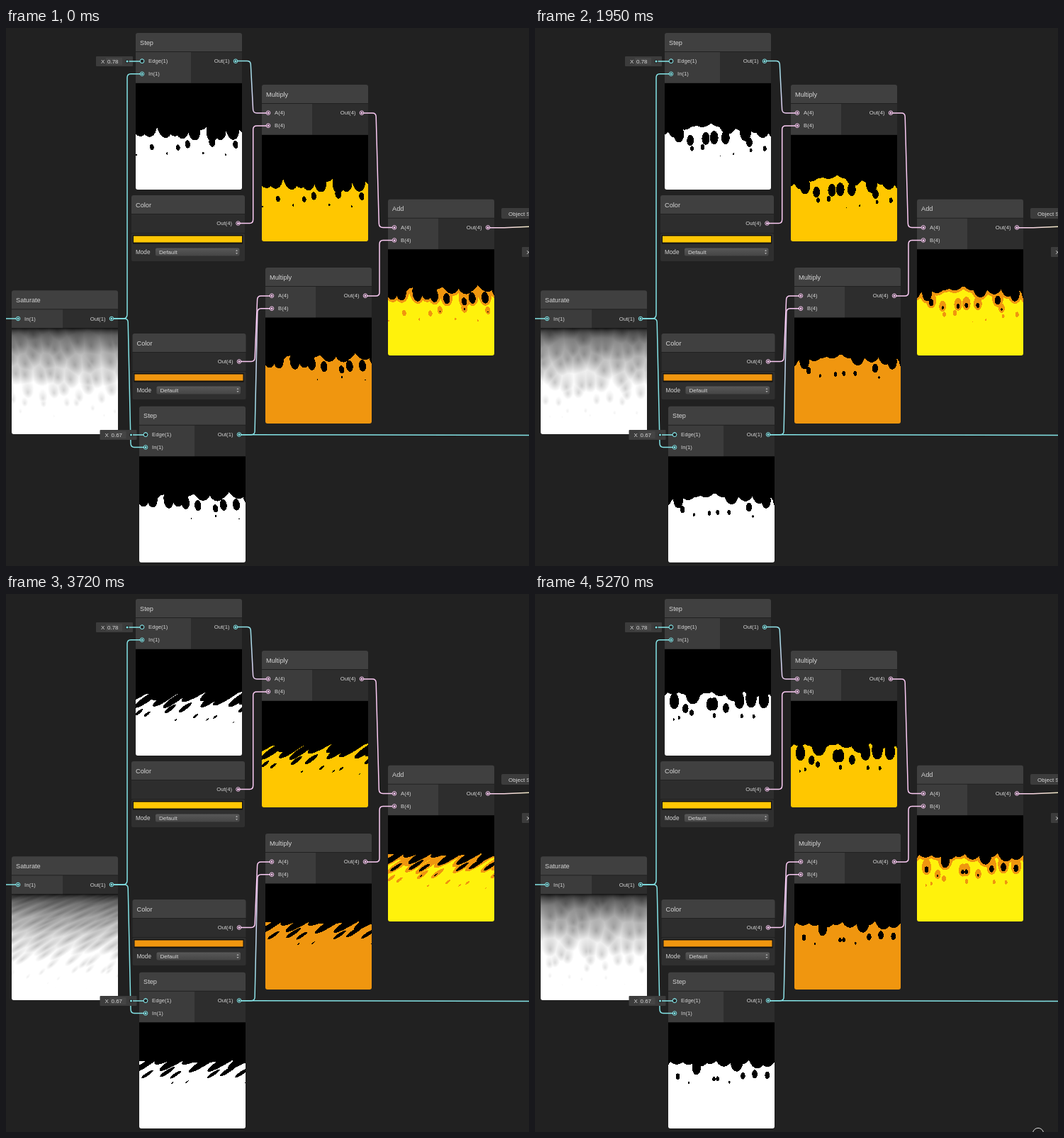
Recreate the animation shown at these times as an HTML page with a canvas. Size 738x759 px, loop 5.37 s.

```html
<!DOCTYPE html>
<html lang="en">
<head>
<meta charset="utf-8">
<title>Flame shader graph</title>
<style>
html, body { margin: 0; width: 100%; height: 100%; overflow: hidden; background: #212121; }
#stage { position: relative; width: 738px; height: 759px; overflow: hidden; background: #212121; }
canvas { position: absolute; width: 150px; height: 150px; border-radius: 0 0 3px 3px; }
svg { position: absolute; left: 0; top: 0; }
text { font-family: "Liberation Sans", Arial, sans-serif; fill: #d6d6d6; }
</style>
</head>
<body>
<div id="stage"><svg id="graph" width="738" height="759" viewBox="0 0 738 759"></svg></div>
<script>
const LOOP = 5370, SIZE = 150;
const CYAN = '#84e4e7', PINK = '#fbcbf4';
const stage = document.getElementById('stage');
const svg = document.getElementById('graph');

// ---------- node graph ----------
const rect = (x, y, w, h, fill, extra = '') =>
  `<rect x="${x}" y="${y}" width="${w}" height="${h}" fill="${fill}" ${extra}/>`;
const text = (x, y, s, size = 7.7, anchor = 'start') =>
  `<text x="${x}" y="${y}" font-size="${size}" text-anchor="${anchor}">${s}</text>`;
const wire = (d, color) => `<path d="${d}" fill="none" stroke="${color}" stroke-width="1.5"/>`;
const port = (x, y, color, linked = true) =>
  `<circle cx="${x}" cy="${y}" r="2.8" fill="#212121" stroke="${color}"/>` +
  (linked ? `<circle cx="${x}" cy="${y}" r="1.5" fill="${color}"/>` : '');
const header = (x, y, w, title) =>
  `<path d="M${x} ${y + 26}V${y + 3}q0 -3 3 -3H${x + w - 3}q3 0 3 3V${y + 26}Z" fill="#404040"/>` +
  text(x + 6, y + 16.5, title, 9.2);

function node(x, y, title, inputs, outColor, outLabel, split) {
  const bodyH = inputs.length > 1 ? 43.5 : 26;
  let s = header(x, y, 150, title) +
    rect(x, y + 27, split, bodyH, '#3c3c3c') +
    rect(x + split, y + 27, 150 - split, bodyH, '#2d2d2d');
  inputs.forEach(([label, color, linked], i) => {
    const py = y + 39.7 + 18 * i;
    s += port(x + 9, py, color, linked) + text(x + 18, py + 2.7, label);
  });
  return s + text(x + 132.5, y + 42.4, outLabel, 7.7, 'end') + port(x + 141, y + 39.7, outColor);
}

function colorNode(x, y, color) {
  return header(x, y, 160, 'Color') +
    rect(x, y + 27, 160, 26, '#2d2d2d') +
    rect(x, y + 54, 160, 39, '#2f2f2f', 'rx="2"') +
    rect(x + 2, y + 56, 155, 12.5, '#111') +
    rect(x + 3, y + 57.5, 153, 9, color) +
    text(x + 142, y + 42.2, 'Out(4)', 7.7, 'end') + port(x + 150.5, y + 39.5, PINK) +
    text(x + 6, y + 83, 'Mode', 8.2) +
    rect(x + 34, y + 74.5, 118.5, 11, 'url(#drop)', 'rx="2"') +
    text(x + 39, y + 82.8, 'Default', 8.1) +
    `<path d="M${x + 147} ${y + 79}h3l-1.5 -2.2zm0 2h3l-1.5 2.2z" fill="#aaa"/>`;
}

const valueBox = (x, y, value) =>
  rect(x, y, 52, 14, '#3c3c3c', 'rx="1"') + rect(x + 14, y + 2, 23, 10, '#454545') +
  text(x + 7, y + 10, 'X', 8) + text(x + 16, y + 10, value, 8) +
  wire(`M${x + 44} ${y + 7}H${x + 62}`, CYAN) +
  `<circle cx="${x + 44}" cy="${y + 7}" r="2.6" fill="#212121"/>` +
  `<circle cx="${x + 44}" cy="${y + 7}" r="1.5" fill="${CYAN}"/>`;

const fade = (id, x1, y1, x2, y2, a, b) =>
  `<linearGradient id="${id}" gradientUnits="userSpaceOnUse" x1="${x1}" y1="${y1}" x2="${x2}" y2="${y2}">` +
  `<stop stop-color="${a}"/><stop offset="1" stop-color="${b}"/></linearGradient>`;

const ab = [['A(4)', PINK, true], ['B(4)', PINK, true]];
const step = [['Edge(1)', CYAN, false], ['In(1)', CYAN, true]];

svg.innerHTML =
  '<defs>' + fade('up', 324, 46, 370, 120, CYAN, PINK) +
  fade('mix', 329, 574, 375, 396, CYAN, PINK) +
  fade('out', 680, 281, 738, 280, PINK, '#eee6c4') +
  '<linearGradient id="drop" x2="0" y2="1"><stop stop-color="#585858"/><stop offset="1" stop-color="#454545"/></linearGradient></defs>' +
  node(183, 7, 'Step', step, CYAN, 'Out(1)', 78) +
  node(361, 80, 'Multiply', ab, PINK, 'Out(4)', 71) +
  colorNode(177, 236, '#ffc704') +
  node(539, 241.7, 'Add', ab, PINK, 'Out(4)', 71) +
  node(366, 338, 'Multiply', ab, PINK, 'Out(4)', 71) +
  node(8, 370.3, 'Saturate', [['In(1)', CYAN, true]], CYAN, 'Out(1)', 72) +
  colorNode(178.5, 431, '#f0960f') +
  node(188, 533.8, 'Step', step, CYAN, 'Out(1)', 78) +
  wire('M326 46.5H340Q345 46.5 345.3 51L348.6 115Q349 120 354 120H368', 'url(#up)') +
  wire('M329 275.5H344Q348.7 275.5 348.7 270V143Q348.7 138 354 138H368', PINK) +
  wire('M504 120H517Q522 120 522.2 125L526.3 276Q526.5 281.5 532 281.5H545', PINK) +
  wire('M509 378H522Q527 378 527 373V305Q527 299.5 532 299.5H545', PINK) +
  wire('M682 281.7H703L738 280.3', 'url(#out)') +
  wire('M0 410H14', CYAN) +
  wire('M152 410H165Q171 410 171 404V70Q171 64.7 176 64.7H190', CYAN) +
  wire('M152 410H167Q172 410 172.2 415L176 586Q176.2 591.5 181 591.5H195', CYAN) +
  wire('M331 470.5H346Q351 470.5 351.2 465L354.6 383Q354.8 378 360 378H373', PINK) +
  wire('M331 573.7H346Q351 573.7 351.1 569L354.8 401Q355 395.7 360 395.7H373', 'url(#mix)') +
  wire('M331 573.7H345L738 574.5', CYAN) +
  valueBox(127, 40, '0.78') + valueBox(132.5, 567, '0.67') +
  port(192, 46.7, CYAN, false) + port(197, 573.8, CYAN, false) +
  rect(699, 254, 45, 15, '#3c3c3c', 'rx="2"') + text(709, 264.5, 'Object Space', 8) +
  rect(728, 309, 20, 14, '#3c3c3c', 'rx="1"') + text(734.5, 319, 'X', 8) +
  '<circle id="cursor" cx="710" cy="761" r="7.6" fill="#1c1c1c" stroke="#ddd"/>';
const cursor = document.getElementById('cursor');

// ---------- previews ----------
const BLACK = [0, 0, 0], WHITE = [255, 255, 255];
const GOLD = [255, 199, 0], ORANGE = [240, 150, 15], YELLOW = [255, 242, 12];
const HIGH = 0.78, LOW = 0.67;
const gray = v => {
  const c = Math.min(1, v);
  const g = 255 * (c < 0.0031 ? 12.92 * c : 1.055 * c ** (1 / 2.4) - 0.055);
  return [g, g, g];
};
const views = [
  [8, 423, gray],
  [183, 78, v => v >= HIGH ? WHITE : BLACK],
  [361, 151, v => v >= HIGH ? GOLD : BLACK],
  [366, 408, v => v >= LOW ? ORANGE : BLACK],
  [188, 604, v => v >= LOW ? WHITE : BLACK],
  [539, 312, v => v >= HIGH ? YELLOW : v >= LOW ? ORANGE : BLACK]
].map(([x, y, shade]) => {
  const c = document.createElement('canvas');
  c.width = c.height = SIZE;
  c.style.left = x + 'px';
  c.style.top = y + 'px';
  stage.insertBefore(c, svg);
  const ctx = c.getContext('2d');
  return { ctx, shade, img: ctx.createImageData(SIZE, SIZE) };
});

const fract = v => v - Math.floor(v);
const cells = new Map();
function cell(i, j) {
  const key = i * 1000 + j;
  let p = cells.get(key);
  if (!p) {
    p = [[127.1, 311.7], [269.5, 183.3]].map(
      ([a, b]) => 0.08 + 0.84 * fract(Math.sin(i * a + j * b) * 43758.5453));
    cells.set(key, p);
  }
  return p;
}

// distance to the nearest cell point
function voronoi(x, y) {
  const i0 = Math.floor(x), j0 = Math.floor(y);
  let best = 9;
  for (let j = j0 - 1; j <= j0 + 1; j++) {
    for (let i = i0 - 1; i <= i0 + 1; i++) {
      const p = cell(i, j), dx = i + p[0] - x, dy = j + p[1] - y;
      best = Math.min(best, dx * dx + dy * dy);
    }
  }
  return Math.sqrt(best);
}

// lean of the flame over time
const leans = [[0, -0.08], [840, -0.08], [1500, -0.95], [1950, 0], [3010, 1.5],
  [3720, 1.25], [4320, 1.1], [5270, 0], [LOOP, 0]];
function leanAt(t) {
  const k = leans.findIndex(p => p[0] > t);
  const [t0, a] = leans[k - 1], [t1, b] = leans[k];
  const f = (t - t0) / (t1 - t0);
  return a + (b - a) * f * f * (3 - 2 * f);
}

function drawFlame(t) {
  const lean = leanAt(t), rise = t * 0.0024;
  for (let py = 0, o = 0; py < SIZE; py++) {
    const v = (py + 0.5) / SIZE, h = 1 - v;
    for (let px = 0; px < SIZE; px++, o += 4) {
      const x = (px + 0.5) / SIZE - lean * h * h;
      const value = v * (1.1 + 1.1 * voronoi(x * 9, h * 6.5 - rise));
      for (const { shade, img } of views) {
        const [r, g, b] = shade(value);
        img.data[o] = r;
        img.data[o + 1] = g;
        img.data[o + 2] = b;
        img.data[o + 3] = 255;
      }
    }
  }
  for (const { ctx, img } of views) ctx.putImageData(img, 0, 0);
}

// ---------- timing: runs of evenly spaced updates ----------
const ticks = [0];
for (const [from, to, n] of [[840, 1320, 6], [1410, 1860, 6], [1950, 2480, 7], [2570, 3100, 7],
  [3190, 3720, 7], [3810, 4320, 7], [4410, 4940, 7], [5030, 5270, 2]]) {
  for (let i = 0; i < n; i++) ticks.push(Math.round((from + (to - from) * i / (n - 1)) / 10) * 10);
}

let shown = -1;
function render(ms) {
  const t = ms % LOOP;
  const now = ticks.filter(k => k <= t).pop();
  if (now === shown) return;
  shown = now;
  drawFlame(now);
  cursor.setAttribute('visibility', now >= 5270 ? 'visible' : 'hidden');
}

const start = performance.now();
function loop() {
  render(performance.now() - start);
  requestAnimationFrame(loop);
}
loop();
</script>
</body>
</html>
```
